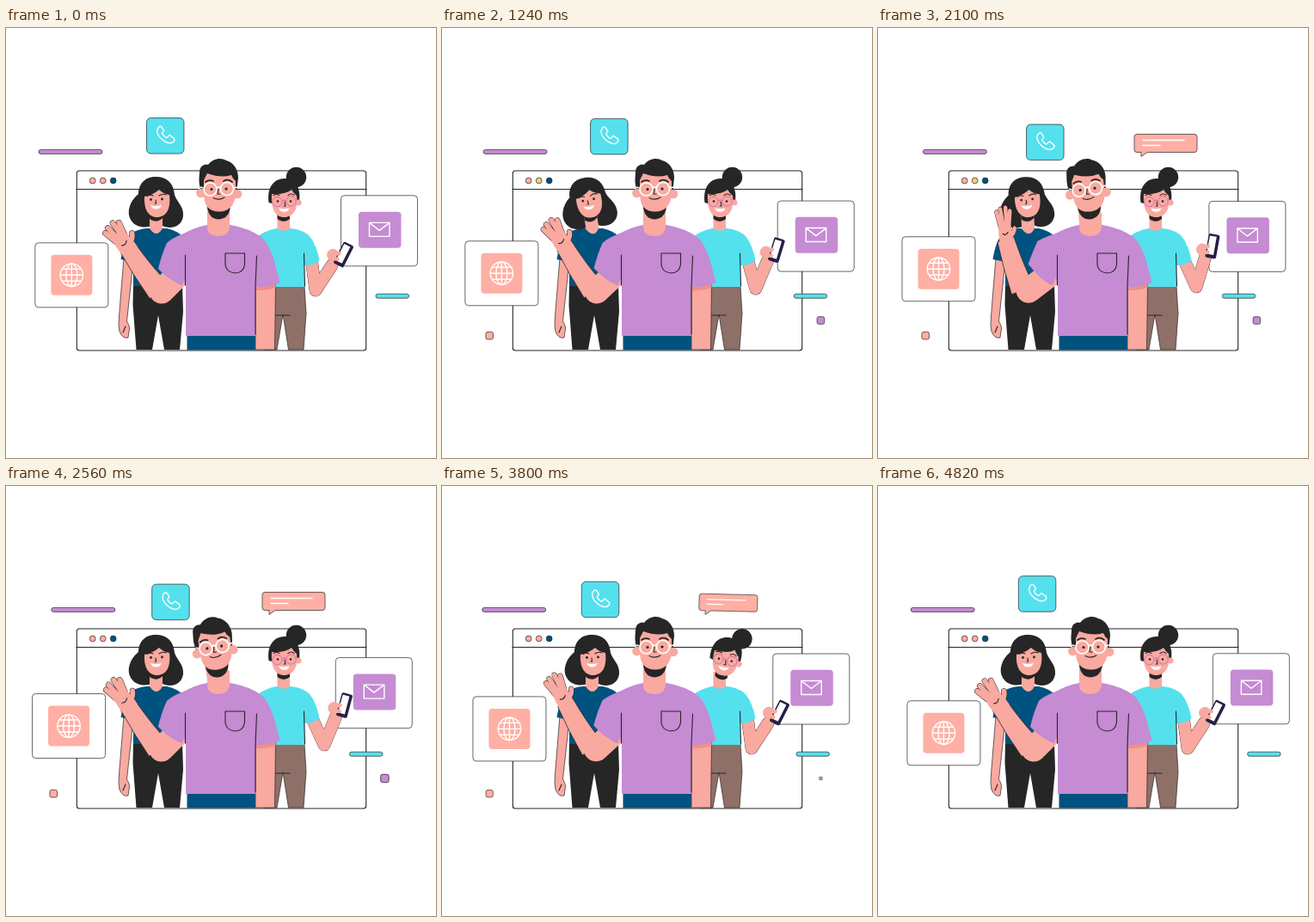
Write an HTML page that moves like this. It is 500x500 px and loops after 4840 ms.

```html
<!DOCTYPE html>
<html lang="en">
<head>
<meta charset="utf-8">
<title>Team greeting</title>
<style>
  html, body { margin: 0; width: 100%; height: 100%; overflow: hidden; background: #fff; }
  svg { display: block; width: 100vw; height: 100vh; }
  .ink { fill: #262626; }
  .skin { fill: #f9a99f; }
  .shade { fill: #f08f85; }
  .navy { fill: #00527f; }
  .violet { fill: #c58bd3; }
  .cyan { fill: #55e0ee; }
  .peach { fill: #ffafa4; }
  .white { fill: #fff; }
  .edge { stroke: #262626; stroke-width: .7; }
  .line { fill: none; stroke: #262626; stroke-width: 1.1; stroke-linecap: round; stroke-linejoin: round; }
  .brow { stroke-width: 1.7; }
  .icon { fill: none; stroke: #fff; stroke-width: 1.4; stroke-linecap: round; stroke-linejoin: round; }
  .limb { fill: none; stroke: #f9a99f; stroke-linecap: round; stroke-linejoin: round; }
  .limb.under { stroke: #262626; }
</style>
</head>
<body>
<svg viewBox="0 0 500 500">
  <defs>
    <path id="fingers" d="M-6-14L-10-31M-2-15L-4-34M3-15L4-35M6-14L10-31"/>
    <path id="thumb" d="M4-5Q11-5 14.500-12"/>
  </defs>

  <!-- browser window -->
  <rect class="line" x="82.3" y="166" width="336.4" height="209" rx="3"/>
  <path class="line" d="M82 187.5H419"/>
  <g class="edge">
    <circle class="peach" cx="100.7" cy="177.5" r="3.4"/>
    <circle id="dot" cx="112.7" cy="177.5" r="3.4"/>
    <circle class="navy" cx="124.7" cy="177.5" r="3.4"/>
  </g>

  <!-- floating pieces -->
  <rect id="bar1" class="violet edge" x="38" y="141.4" width="74" height="5" rx="2.5"/>
  <rect id="bar2" class="cyan edge" x="430" y="309.2" width="38.5" height="5" rx="2.5"/>
  <rect id="chip1" class="peach edge" x="-4.3" y="-4.3" width="8.6" height="8.6" rx="2"/>
  <rect id="chip2" class="violet edge" x="-4.3" y="-4.3" width="8.6" height="8.6" rx="2"/>
  <g id="bubble">
    <path class="peach edge" d="M-6-26H61Q64-26 64-23V-8Q64-5 61-5H6L-1 0V-5H-6Q-9-5-9-8V-23Q-9-26-6-26Z"/>
    <path class="icon" d="M1-19H49M1-13H21"/>
  </g>
  <g id="call">
    <rect class="cyan edge" width="43.5" height="41.5" rx="5"/>
    <path class="icon" d="M15 10C11 13 12 18 15 22C19 27 25 30 29 29C32 28 34 25 31 23L27 20C25 20 25 23 23 23C21 22 19 20 18 18C18 16 21 16 20 14L17 10Q16 9 15 10Z"/>
  </g>
  <g id="web">
    <rect class="white edge" width="85" height="75" rx="4"/>
    <rect class="peach" x="18.5" y="14" width="48" height="47" rx="4"/>
    <g class="icon">
      <circle cx="42.5" cy="37.5" r="13.2"/>
      <ellipse cx="42.5" cy="37.5" rx="6.5" ry="13.2"/>
      <path d="M42.5 24.3V50.7M29.3 37.5H55.7M31.5 30.5H53.5M31.5 44.5H53.5"/>
    </g>
  </g>
  <g id="mail">
    <rect class="white edge" width="89" height="82" rx="4"/>
    <rect class="violet" x="20.5" y="18.8" width="49.5" height="42" rx="4"/>
    <path class="icon" d="M33 31.5H56.5V47.5H33ZM33 31.5L44.7 40.5L56.5 31.5"/>
  </g>

  <!-- woman on the right -->
  <path fill="#8f7068" class="edge" d="M300 300H347L349 332L346 374H328.5L322 333L315 374H300Z"/>
  <path class="line" d="M313 334H330"/>
  <path class="limb under" id="armUnder" stroke-width="14.6"/>
  <path class="limb" id="arm" stroke-width="14"/>
  <g id="device">
    <circle class="skin" cx="-11" cy="6" r="7"/>
    <rect x="-6.500" y="-14" width="13" height="28" rx="2" fill="#262045"/>
    <path class="white" d="M-5-11.500H3V10H-5Z"/>
    <path class="limb" stroke-width="4.5" d="M-12 6L-5 1M-12 10L-4 8"/>
  </g>
  <path class="cyan" d="M290 301V244Q300 236 314 233H332Q346 235 353 242Q361 252 364.5 270Q358 276 347 276V301Z"/>
  <path class="line" d="M346.5 262L347.5 300"/>
  <path class="skin" d="M315.500 216H330V233Q323 239 315.500 233Z"/>
  <g id="head3">
    <path class="ink" d="M315.500 212H330V222Q323 228 315.500 222Z"/>
    <circle class="ink" cx="337.500" cy="173.500" r="11.700"/>
    <path class="ink" d="M305.500 203C303 186 311 175 324 175C336 175 343 185 341 201L338 204H309Z"/>
    <circle class="skin" cx="340" cy="203" r="3.5"/>
    <path class="skin" d="M309 193Q325 194 332 188Q335 193 338 195C340 211 334 220 323.500 220C313 220 308 211 309 193Z"/>
    <path class="line" d="M311 194.500Q315 192.500 318 194.500M328 194.500Q332 191.500 335 194.500M324 202L325 207H323"/>
    <g fill="none" stroke="#cf6fae" stroke-width="1"><circle cx="315.500" cy="202" r="5.700"/><circle cx="331.500" cy="201.500" r="5.700"/><path d="M321 201Q323.500 199 326 201"/></g>
    <circle class="ink" cx="316" cy="201.500" r="1.3"/><circle class="ink" cx="331" cy="201.500" r="1.3"/>
    <path class="white" d="M317 209.500Q323 211 329.500 209.500Q328 214 323.500 214Q319 214 317 209.500Z"/>
  </g>

  <!-- woman on the left -->
  <path class="skin edge" d="M137 267L148 272L140.500 341Q145 348 143 353L142 360Q136 362 132 353L131 345L131.500 335Z"/>
  <path class="line" d="M139 347L136 354"/>
  <path class="ink" d="M148 298H205L206 330L202 374H184L177 334L170 374H151.500L147.500 322Z"/>
  <path class="navy" d="M133.500 269Q137 247 145 239Q153 234 163 233H187Q200 236 206 243V300H148V272Z"/>
  <g id="head1">
    <path class="ink" d="M174 173C160 173 154 183 154 193C143 202 140 215 145 223C151 233 164 233 172 229H180C190 235 204 232 206 219C207 207 199 203 196 194C195 181 188 173 174 173Z"/>
    <path class="skin" d="M167 212H182V233Q175 245 167 233Z"/>
    <path class="ink" d="M167 212H182V221Q175 228 167 222Z"/>
    <path class="skin" d="M161 196Q171 194 178 188Q183 193 190 194C192 211 186 220 175.500 220C166 220 160 211 161 196Z"/>
    <path class="line" d="M164 195.500Q168 193 171 195M178 195Q182 192 186 194M174 200L174.500 204H173"/>
    <circle class="ink" cx="168.500" cy="199.500" r="1.4"/><circle class="ink" cx="181.500" cy="199" r="1.4"/>
    <path class="white" d="M168 206Q174 208 181 206Q179 210.500 174.500 210.500Q170 210.500 168 206Z"/>
  </g>

  <!-- man -->
  <path class="skin edge" d="M290 296H313.500L312.500 374H290Z"/>
  <path class="shade" d="M290.500 298H313.500V302Q302 306 290.500 305Z"/>
  <path class="navy" d="M210.500 355H290V374.500H210.500Z"/>
  <g id="forearm">
    <path class="skin edge" d="M-14 4Q-13.500-28-10-59H10Q10-30 12-12L13 4Z"/>
    <g id="hand">
      <g class="limb under"><use href="#fingers" stroke-width="6.800"/><use href="#thumb" stroke-width="6.800"/></g>
      <path class="skin" d="M-10 4Q-11-8-9-18H9Q11-6 10 4Z"/>
      <g class="limb"><use href="#fingers" stroke-width="5.800"/><use href="#thumb" stroke-width="5.800"/></g>
      <path class="line" d="M-4-8Q0-5 4-9"/>
    </g>
  </g>
  <path class="limb" id="upper" stroke-width="29"/>
  <path class="violet" id="sleeve"/>
  <path class="violet" d="M209 358V300L200 262L205 240Q218 232 234 229H261Q284 233 298 244Q306 252 312 271L318.500 296Q306 302 290.500 301V358Z"/>
  <path class="line" d="M208.500 264V299M291.500 265L290 301V356M255 262H277.500V275Q276 285 266 285Q256 284 255 275Z"/>
  <path class="skin" d="M234 215H260V231Q259 242 247 242Q234 242 234 231Z"/>
  <g id="head2">
    <path class="skin" d="M234 205H260V224H234Z"/>
    <path class="ink" d="M227 189C223 180 225 172 225 168C225 160 231 158 235 159C240 152 250 150 256 154C264 156 270 164 270 174L268 193H230Z"/>
    <circle class="skin" cx="226.500" cy="192" r="5.300"/><circle class="skin" cx="269" cy="193" r="5.300"/>
    <path class="ink" d="M233.500 203H261.500Q261 222 247 222.500Q234 222 233.500 203Z"/>
    <path class="skin" d="M230 177Q232 173 234 169Q250 175 262 171Q264 176 267 178V195C265 207 259 213.500 248 213.500C236 213.500 231 207 230 195Z"/>
    <path class="line brow" d="M232 179Q236 176 241 178M253 178Q258 175 263 179"/>
    <path class="line" d="M247 187L246 193H249M241 197.500Q247 201 254 197"/>
    <circle class="ink" cx="239" cy="187.500" r="1.600"/><circle class="ink" cx="256" cy="187" r="1.600"/>
    <g fill="none" stroke="#fff" stroke-width="1.700"><circle cx="237.500" cy="187.500" r="7.500"/><circle cx="257" cy="187" r="7.500"/><path d="M245 186Q247.500 184 249 186M229.500 186L226 185M265 186L269 185"/></g>
  </g>
</svg>

<script>
const LOOP = 4840, TAU = Math.PI * 2;
const el = id => document.getElementById(id);
const set = (id, name, value) => el(id).setAttribute(name, value);
const move = (id, value) => set(id, 'transform', value);
const clamp = x => Math.min(1, Math.max(0, x));
const smooth = x => x * x * (3 - 2 * x);

// Eased value between [time, value] stops, held outside them.
function key(t, ...stops) {
  let [t0, value] = stops[0];
  for (const [t1, next] of stops.slice(1)) {
    value += (next - value) * smooth(clamp((t - t0) / (t1 - t0)));
    t0 = t1;
  }
  return value;
}

// Slow circular drift, a little ahead of even speed in mid loop.
function drift(id, t, x, y, rx, ry, start, lead) {
  const p = t / LOOP;
  const a = (start + lead * Math.sin(Math.PI * p) ** 2) * TAU / 360 + TAU * p;
  move(id, `translate(${x + rx * Math.cos(a)} ${y + ry * Math.sin(a)})`);
}

function draw(t) {
  drift('call', t, 167.7, 108.7, 6, 5.8, 225, 15);
  drift('mail', t, 387.3, 198.2, 4.3, 3.9, 300, 29);
  drift('web', t, 31.3, 246, 4.8, 4.5, 58, 13);

  const slide = 1 - Math.abs(t / 2420 - 1) ** 1.55;
  move('bar1', `translate(${15 * slide} 0)`);
  move('bar2', `translate(${-31 * slide} 0)`);

  const grow1 = key(t, [760, 0], [1200, 1], [2600, 1], [3100, 1.1], [3750, 1], [4150, 0]);
  const grow2 = key(t, [380, 0], [780, 1], [2100, 1], [2560, 1.1], [3120, 1], [3560, 1], [4010, 0]);
  move('chip1', `translate(55.2 357.7) scale(${grow1})`);
  move('chip2', `translate(440.4 340) scale(${grow2})`);

  const pop = key(t, [1300, 0], [1640, 1], [3720, 1], [4220, 0]);
  const lean = key(t, [1300, -20], [1600, 5], [1680, 5], [1950, 0], [3650, 0], [4220, 8]);
  move('bubble', `translate(307 149.500) rotate(${lean}) scale(${pop})`);

  move('head1', `rotate(${key(t, [200, 0], [950, -9], [1700, -9], [2400, 0])} 177 230)`);
  move('head2', `rotate(${key(t, [1700, 0], [2300, -8], [2600, -8], [3100, 0])} 247 225)`);
  move('head3', `rotate(${key(t, [2600, 0], [3400, 12], [3900, 12], [4500, 0])} 323 230)`);

  // four waves of the hand
  const w = (1 - Math.cos(4 * TAU * clamp((t - 240) / 4500))) / 2;
  move('forearm', `translate(${176 - 11 * w} ${303 - 2 * w}) rotate(${-36 + 22 * w})`);
  move('hand', `translate(0 -57) rotate(${-2 + 19 * w}) scale(${1 - .3 * w} ${1 + .1 * w})`);
  set('upper', 'd', `M${181 - 7.5 * w} ${306 - w}L203 284`);
  set('sleeve', 'd', `M212 237Q194 243 ${187 - 2 * w} ${250 - 3 * w}Q${181 - 3 * w} 263 ${177 - 3 * w} ${280 - 7 * w}Q189 293 ${205 - 3 * w} 299.500L216 270Z`);

  // phone check
  const lift = key(t, [900, 0], [1600, 1], [2560, 1], [3050, 0]);
  const glance = (a, b, c) => key(t, [900, a], [1600, b], [1750, b], [2500, c], [2600, c], [3050, a]);
  const px = glance(392.5, 385, 393.5), py = glance(263.5, 252.5, 255), tilt = glance(27, 6, 15);
  const armPath = `M355 268L${360 + 10 * lift} ${305 - 4 * lift}L${glance(379, 378, 384)} ${glance(276, 265, 267)}`;
  set('arm', 'd', armPath);
  set('armUnder', 'd', armPath);
  move('device', `translate(${px} ${py}) rotate(${tilt})`);

  const yellow = (t > 1230 && t < 2110) || (t > 2840 && t < 3460);
  set('dot', 'fill', yellow ? '#f0cf72' : t > 400 && t < 1230 ? '#f6d2cd' : '#ffafa4');
}

const begin = performance.now();
function frame() {
  draw((performance.now() - begin) % LOOP);
  requestAnimationFrame(frame);
}
frame();
</script>
</body>
</html>
```
